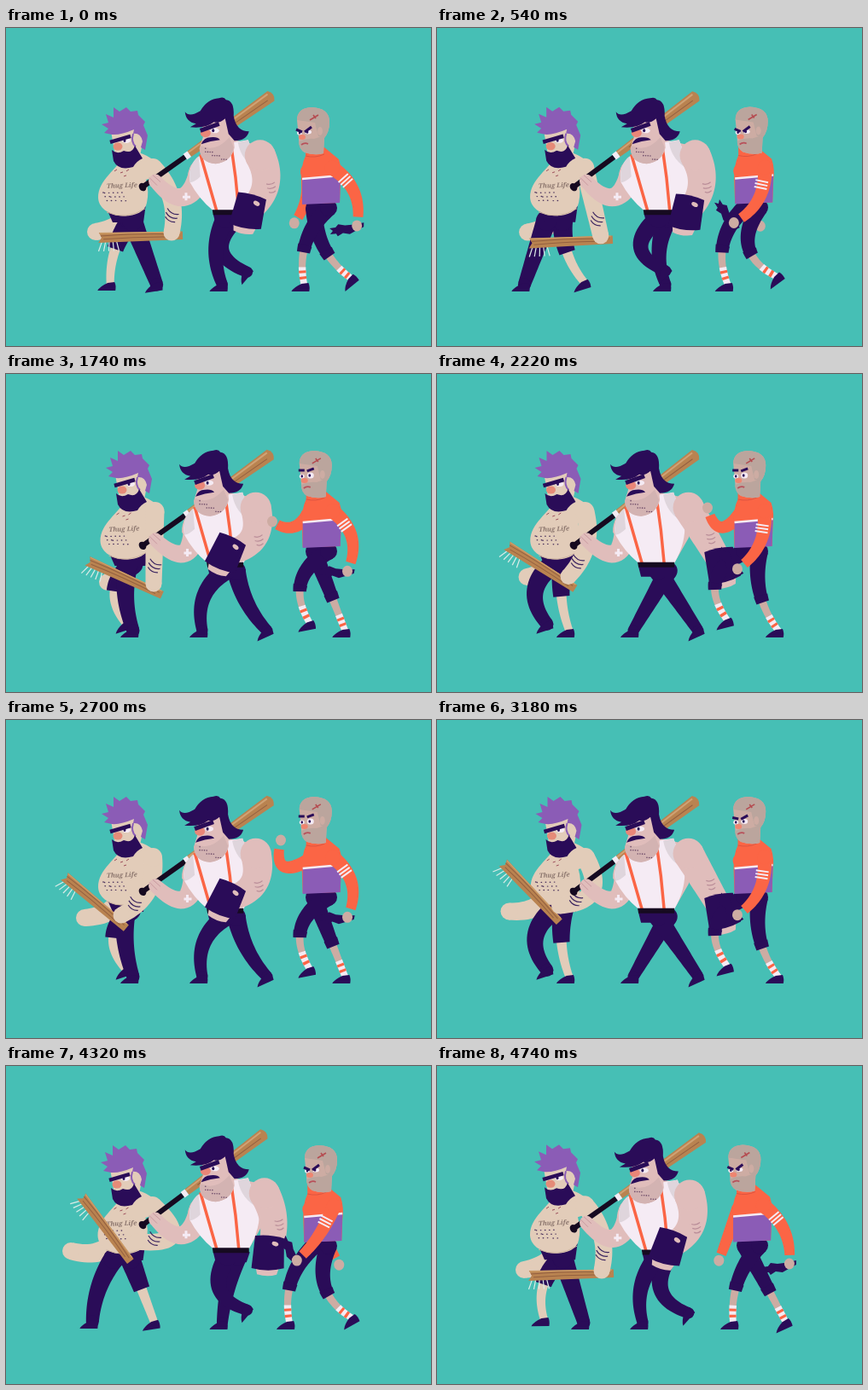
Animation of 498 by 373 pixels, one loop 4.8 s. Source, as an HTML page with a canvas:

```html
<!DOCTYPE html>
<html>
<head>
<meta charset="utf-8">
<title>Three walkers</title>
<style>
html, body { margin: 0; width: 100%; height: 100%; overflow: hidden; background: #46bfb5; }
canvas { display: block; width: 100vw; height: 100vh; }
</style>
</head>
<body>
<canvas id="stage" width="498" height="373"></canvas>
<script>
const ctx = document.getElementById('stage').getContext('2d');
const LOOP = 4800, STEP = 60, CYCLE = 960, TAU = Math.PI * 2;
const NAVY = '#2a0c58', BLACK = '#160a20', ORANGE = '#fb6545', PURPLE = '#8b5cb6', WHITE = '#f5ebf4', WOOD = '#b98350';
const BEIGE = '#e2ccb9', PINK = '#e0bdbb', TAN = '#cdaca3', STUBBLE = '#bba59d';
const POSES = [0, 1020, 1740, 2700, 3660, 4320, 4740, LOOP];
let t = 0, phase = 0;

const mix = (a, b, k) => a + (b - a) * k;

// Eases through one value per pose, wrapping at the end of the loop.
function track(...v) {
  const i = POSES.findIndex((p, n) => t < POSES[n + 1]);
  const k = (t - POSES[i]) / (POSES[i + 1] - POSES[i]);
  return mix(v[i], v[(i + 1) % v.length], k * k * (3 - 2 * k));
}
const swing = offset => Math.cos(TAU * (phase - offset));
const bob = offset => Math.cos(2 * TAU * (phase - offset));

function shape(d, color) {
  ctx.fillStyle = color;
  ctx.fill(new Path2D(d));
}
function line(d, color, width) {
  ctx.strokeStyle = color;
  ctx.lineWidth = width;
  ctx.stroke(new Path2D(d));
}
function oval(x, y, rx, ry, color, angle = 0) {
  ctx.fillStyle = color;
  ctx.beginPath();
  ctx.ellipse(x, y, rx, ry, angle, 0, TAU);
  ctx.fill();
}
function at(x, y, angle, draw) {
  ctx.save();
  ctx.translate(x, y);
  ctx.rotate(angle);
  draw();
  ctx.restore();
}
function joint([ax, ay], [bx, by], length, side) {
  const dx = bx - ax, dy = by - ay, d = Math.hypot(dx, dy) || 1;
  const h = side * Math.sqrt(Math.max(0, length * length - d * d / 4)) / d;
  return [(ax + bx) / 2 + dy * h, (ay + by) / 2 - dx * h];
}
// Tapered curve through three points; from/to select a part, cut flat except at the outer ends.
function limb(a, b, c, r0, r1, color, from = 0, to = 1) {
  const left = [], right = [];
  const ctrl = [0, 1].map(n => 2 * b[n] - (a[n] + c[n]) / 2);
  for (let i = 0; i <= 24; i++) {
    const k = mix(from, to, i / 24), r = mix(r0, r1, k);
    const [x, y] = [0, 1].map(n => mix(mix(a[n], ctrl[n], k), mix(ctrl[n], c[n], k), k));
    const [dx, dy] = [0, 1].map(n => mix(ctrl[n] - a[n], c[n] - ctrl[n], k));
    const s = r / (Math.hypot(dx, dy) || 1);
    left.push([x + dy * s, y - dx * s]);
    right.unshift([x - dy * s, y + dx * s]);
  }
  ctx.fillStyle = color;
  ctx.beginPath();
  for (const p of [...left, ...right]) ctx.lineTo(...p);
  ctx.fill();
  if (from === 0) oval(...a, r0, r0, color);
  if (to === 1) oval(...c, r1, r1, color);
}
function foot(center, reach, offset, lift) {
  const a = TAU * (phase - offset);
  return {
    pos: [center - reach * Math.cos(a), 303 - lift * Math.max(0, -Math.sin(a))],
    tilt: -0.055 * lift * Math.max(0, -Math.sin(a + 0.5))
  };
}
// Each part is [radius at hip, radius at ankle, color, from, to].
function leg(hip, { pos, tilt }, length, parts) {
  const ankle = [pos[0] + 3, pos[1] - 2], knee = joint(hip, ankle, length, -1);
  for (const part of parts) limb(hip, knee, ankle, ...part);
  at(...pos, tilt, () => shape('M-12 6Q-9 1 0 -3L8 -4Q10 0 9 6Z', NAVY));
}
function bat([x0, y0], [x1, y1], draw) {
  at(x0, y0, Math.atan2(y1 - y0, x1 - x0), () => draw(Math.hypot(x1 - x0, y1 - y0)));
}

function drawPunk() {
  const lean = track(0, 4, 5, 0, 7, -1, 2), dy = 1.6 * bob(0.02) - 1.6, dx = lean / 2;
  const farHand = [track(105, 107, 119, 92, 77, 76, 102), track(239, 240, 244, 232, 217, 217, 239)];
  const hand = [track(194, 190, 173, 135, 152, 153, 193), track(240, 247, 246, 229, 207, 206, 240)];
  const tip = [track(108, 107, 95, 68, 86, 88, 107), track(246, 258, 219, 183, 151, 152, 246)];
  const butt = [track(207, 205, 183, 141, 146, 146, 207), track(243, 252, 259, 244, 229, 229, 243)];

  const farShoulder = [140 + dx, 178 + dy];
  limb(farShoulder, joint(farShoulder, farHand, 42, 1), farHand, 14, 10, BEIGE);

  leg([146 + dx, 226 + dy], foot(145, 26, 0.02, 8), 39.5, [[7, 4.5, BEIGE, 0.4, 1], [12, 7, NAVY, 0, 0.48]]);
  const darkFoot = foot(136, 38, 0.52, 8);
  leg([mix(138, darkFoot.pos[0], 0.28) + dx, 226 + dy], darkFoot, 39.5, [[12, 7.5, NAVY]]);

  at(dx, dy, 0, () => {
    shape('M118 212L164 206L161 228L125 228Z', NAVY);
    shape('M138 150C130 166 108 178 108 199C109 225 161 228 165 205Q168 192 164 178L182 172C182 160 170 151 158 147Z', BEIGE);
    line('M118 216Q140 226 163 212', '#cbb29e', 1);
    at(118, 188, -0.04, () => {
      ctx.fillStyle = '#8a746c';
      ctx.font = 'italic bold 7.5px "Noto Serif", serif';
      ctx.fillText('Thug Life', 0, 0);
    });
    for (let i = 0; i < 17; i++)
      oval(114 + (i * 7.3) % 27, 193 + (i * 4.7) % 14, 0.9, 0.7, '#4a315c');
    line('M127 168l3 -2M134 170l3 -1M141 168l3 -2M138 174l3 -1', '#9d4e5b', 1);
  });

  at(lean, dy, 0, () => {
    shape('M123 121L150 112L161 130L156 155L128 150Z', BEIGE);
    shape('M112 113L120 111L117 101L126 105L126 93L133 98L141 93L146 98L154 97L155 102L163 110L161 114L166 126L163 143L158 140L160 133Q158 123 149 124L150 119Q134 126 124 125L115 123L120 118Z', PURPLE);
    line('M149 124Q146 134 152 139', PURPLE, 2);
    oval(131, 139, 5.5, 4.5, '#e58b78');
    oval(141, 132, 5, 3, WHITE);
    oval(139, 132, 1.5, 2, NAVY);
    line('M122 134L146 127', NAVY, 4.5);
    shape('M124 143Q130 149 138 144Q148 148 151 138L160 153Q153 156 149 163Q132 168 126 156Z', NAVY);
  });

  bat(tip, butt, len => {
    for (let i = 0; i < 5; i++) line(`M${5 + i * 4} 3l${-5 + i * 2} 13`, '#dcece8', 1.2);
    shape(`M1 -6L4 0L0 6L${len} 5L${len} -4.5Z`, WOOD);
    line(`M3 -2Q${len / 2} -4 ${len - 4} -1M6 2Q${len / 2} 0 ${len - 8} 2`, '#946040', 1);
    line(`M2 -5L${len - 2} -4`, '#d0a06b', 1.2);
  });
  const shoulder = [172 + dx, 164 + dy], elbow = joint(shoulder, hand, 41, 1);
  limb(shoulder, elbow, hand, 11, 9.5, BEIGE);
  at((elbow[0] + hand[0]) / 2, (elbow[1] + hand[1]) / 2, 0.35, () =>
    line('M-7 -6Q0 0 8 -4M-7 -1Q0 5 8 1M-6 4Q0 9 7 6', '#3b2460', 1.2));
}

function drawBoss() {
  const dy = 4 - 4 * bob(0.03), dx = -0.9 * dy, turn = 2.5 - 2.5 * swing(0);
  const fist = [175, 179 + 2 * dy], farShoulder = [229 + dx, 168 + dy];

  bat([308 + 4.5 * swing(0.93), 78 + 2 * dy], [160, 186 + 2 * dy], len => {
    const grip = len * 0.64;
    shape(`M2 -7Q-4 0 2 7L${grip} 4L${grip} -4Z`, WOOD);
    line(`M4 4L${grip} 2`, '#d0a274', 2);
    line(`M8 -2L${grip - 15} -1`, '#946040', 1);
    line(`M${grip} 0h6`, WHITE, 8);
    line(`M${grip + 6} 0H${len}`, BLACK, 6);
    oval(len, 0, 4, 5, BLACK);
  });
  const farElbow = joint(farShoulder, fist, 37, 1);
  limb(farShoulder, farElbow, fist, 14, 8, PINK);
  line(`M${farElbow[0]} ${farElbow[1]}h9m-5 -5v9`, WHITE, 3);
  line(`M${fist[0] - 7} ${fist[1] - 4}l9 9m-5 -12l9 8`, '#c99aa0', 1);

  const hip = 223 + dy;
  leg([269 + turn / 2, hip], foot(265, 38, 0.3125, 16), 40, [[11, 6.5, NAVY]]);
  leg([257 + turn / 2, hip], foot(265, 38, 0.8125, 16), 40, [[11, 6.5, NAVY]]);

  at(dx, dy, 0, () => {
    shape('M234 146Q212 158 213 178L243 214L285 214L302 184L300 138L262 130Z', PINK);
    shape('M228 149Q212 162 216 181Q226 200 243 214L285 214Q299 190 297 166Q290 148 284 131L266 134L260 150L240 157Z', WHITE);
    shape('M226 150Q213 160 216 181Q222 180 228 174ZM284 131L272 134Q276 156 296 166Q290 148 284 131Z', '#dfd5dc');
    line('M228 148L247 214M264 137Q270 175 273 214', ORANGE, 3.5);
    shape('M243 218L286 218L282 230L246 230Z', NAVY);
    shape('M242 213L285 213L285 219L243 219Z', BLACK);

    shape('M230 106L264 100L268 140Q264 157 246 159Q228 158 227 141L231 128Z', PINK);
    shape('M229 138Q246 146 262 128L267 140Q264 157 246 159Q228 158 227 141Z', '#d3b3b2');
    oval(234, 123, 6, 5, '#e98678');
    oval(245, 120, 5, 3, WHITE);
    oval(243, 120, 1.5, 2, NAVY);
    line('M228 120L250 112', NAVY, 5);
    shape('M229 136Q232 128 240 128Q248 127 251 131Q240 132 229 136Z', NAVY);
    for (let i = 0; i < 12; i++)
      oval(234 + (i * 8.1) % 27, 141 + (i * 4.3) % 13, 0.8, 0.8, '#6c4967');
    shape('M210 98Q215 105 228 97Q236 83 250 82Q256 80 258 84Q268 85 267 103Q270 121 285 121Q282 132 268 132L261 124L257 106Q250 112 244 110Q234 118 216 116L223 112Q211 110 210 98Z', NAVY);
  });

  const forward = swing(0.8), hand = [296 - 38 * forward, 217 - 7 * forward];
  const shoulder = [298 + turn + dx, 149 + dy], elbow = joint(shoulder, hand, 36, 1);
  limb(shoulder, elbow, hand, 18, 14, PINK);
  at(elbow[0] + 7, elbow[1] + 2, -0.2, () =>
    line('M-5 -5q5 3 10 0M-5 0q5 3 10 0M-4 5q4 3 8 0', '#b98d98', 1.2));
  at(...hand, 0.4 * (Math.atan2(hand[1] - elbow[1], hand[0] - elbow[0]) - Math.PI / 2), () => {
    shape('M-15 14L-12 26Q0 29 11 25L14 14Z', PINK);
    shape('M-17 -19Q0 -22 17 -18L19 17Q0 23 -19 19Z', NAVY);
    oval(7, -11, 4, 2.5, PINK, 0.3);
  });
}

function drawRunner() {
  const dy = 1.8 * bob(0.5) - 1.8, headX = 4.5 - 4.5 * swing(0), dx = headX / 4;
  const near = swing(0.95), far = swing(0.88), reach = track(0, 0, 1, 1, 0, 0, 0);
  const farHand = [
    mix(364 - 36 * far, track(313, 313, 312, 322, 322, 313, 313), reach),
    mix(231 - 3 * far, track(174, 174, 173, 141, 141, 174, 174), reach)
  ];
  const farShoulder = [353 + dx, 168 + dy];
  const farElbow = joint(farShoulder, farHand, track(32, 32, 24, 30, 32, 32, 32), 1);
  oval(...farHand, 6, 6.5, TAN);
  limb(farShoulder, farElbow, farHand, 8, 5.5, ORANGE, 0, 0.88);

  const parts = [
    [6, 3.5, TAN, 0.5, 0.82], [6, 3.8, WHITE, 0.8, 1],
    [6, 3.9, ORANGE, 0.84, 0.87], [6, 3.9, ORANGE, 0.91, 0.94], [10, 5.5, NAVY, 0, 0.56], [12, 5, NAVY, 0.53, 0.62]
  ];
  leg([361, 211 + dy], foot(366, 40, 0.4375, 16), 49, parts);
  leg([378, 211 + dy], foot(375, 31, 0.9375, 12), 49, parts);

  at(dx, dy, 0, () => {
    shape('M351 140L373 140L390 154Q394 166 392 180L391 205L347 206L346 178Q346 160 351 150Z', ORANGE);
    shape('M347 177L392 173L391 205L347 207Z', PURPLE);
    line('M347 177L392 173', WHITE, 2.5);
    line('M351 150Q362 153 373 148', '#dd5440', 1);
  });

  at(headX, dy, 0, () => {
    const calm = track(0, 0, 1, 1, 0, 0, 0);
    shape('M341 108Q341 94 358 93Q379 94 379 110Q379 122 373 129L372 147Q362 150 350 146Q343 142 343 130Z', TAN);
    shape('M341 108Q341 94 358 93Q379 94 379 110Q379 122 373 129L366 127L362 111Z', STUBBLE);
    shape('M343 133Q352 129 361 130L373 126L372 147Q362 150 350 146Q343 142 343 133Z', STUBBLE);
    oval(368, 121, 3, 5, TAN);
    oval(344, 123, 3, 2.5, WHITE);
    oval(354, 122, 4, 2.5 + calm, WHITE);
    oval(353, 122, 1.4, 1.8, NAVY);
    oval(344, 123, 1.2, 1.6, NAVY);
    oval(347, 128, 4, 3, '#ee8570');
    line(`M340 ${119 - calm * 3}L347 ${122 - calm * 6}M350 ${122 - calm * 5}L358 ${116 - calm * 2}`, NAVY, 3);
    line('M346 137Q350 134 354 136', '#b8505a', 1.8);
    line('M356 108L366 102M360 102l3 4', '#b54b50', 1.6);
  });

  const hand = [376 + 37 * near, 230 + 2 * near], shoulder = [382 + dx, 164 + dy];
  const elbow = joint(shoulder, hand, 39, 1);
  at(hand[0], hand[1], 0.65 - 0.65 * near, () =>
    shape('M8 -4L8 1L-1 6L-8 10L-16 9L-22 13L-24 10L-31 11L-28 7L-32 4L-25 3L-22 -1L-14 0L-6 -1Z', NAVY));
  oval(...hand, 6, 6.5, TAN);
  limb(shoulder, elbow, hand, 8.5, 5.5, ORANGE, 0, 0.88);
  const tilt = Math.atan2(elbow[1] - shoulder[1], elbow[0] - shoulder[0]) - Math.PI / 2;
  at(mix(shoulder[0], elbow[0], 0.62), mix(shoulder[1], elbow[1], 0.55), tilt, () =>
    line('M-7 -5L8 -5M-7 -1L8 -1M-7 3L8 3', WHITE, 2));
}

function frame(now) {
  t = Math.floor(now / STEP) * STEP % LOOP;
  phase = t / CYCLE % 1;
  ctx.fillStyle = '#46bfb5';
  ctx.fillRect(0, 0, 498, 373);
  drawPunk();
  drawBoss();
  drawRunner();
  requestAnimationFrame(frame);
}
requestAnimationFrame(frame);
</script>
</body>
</html>
```
